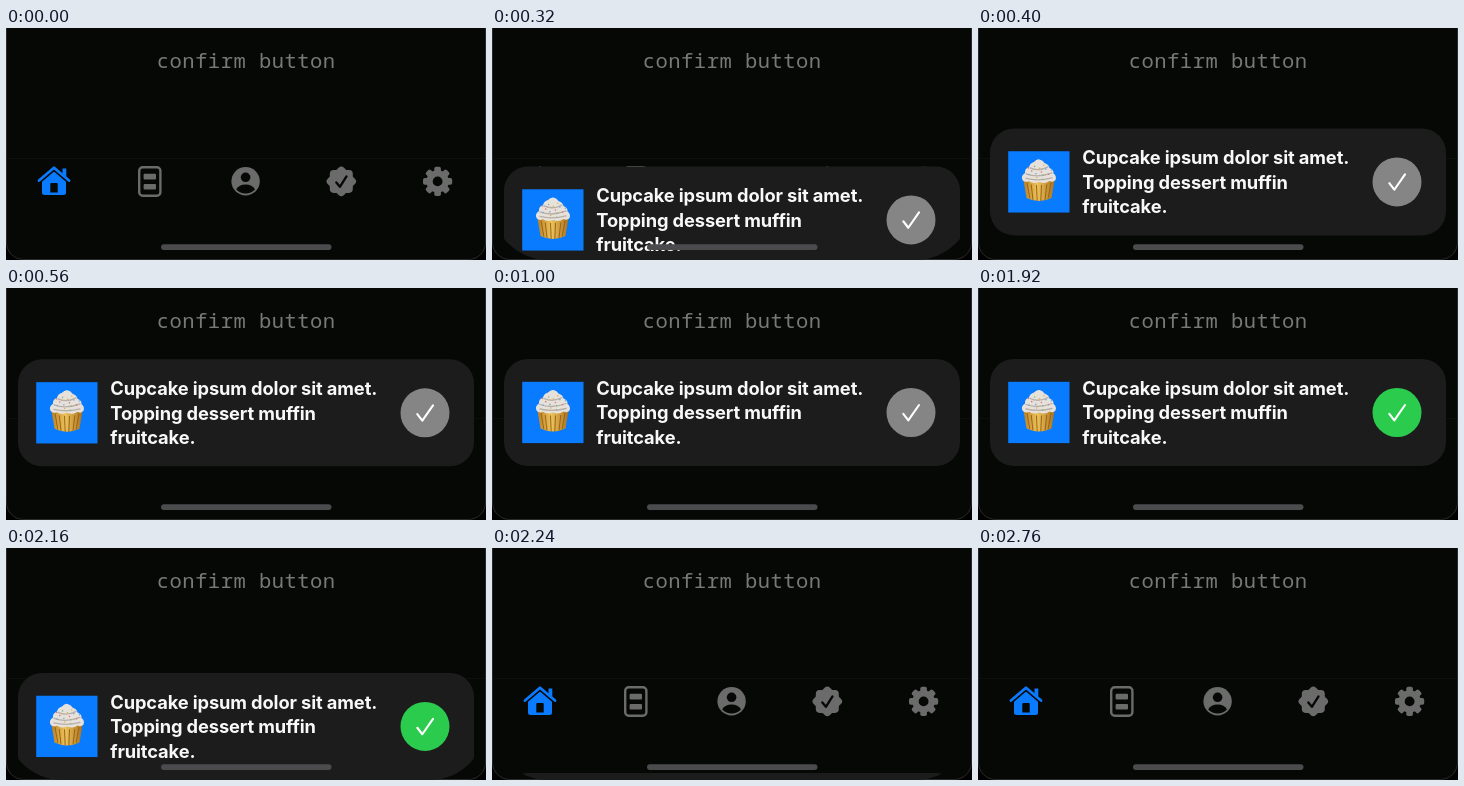
Recreate the animation shown at these times as an HTML page. Size 480 px wide and 232 px high, loop 2800 ms.

```html
<!DOCTYPE html>
<html lang="en">
<head>
<meta charset="utf-8">
<title>Confirm button</title>
<style>
html, body { margin: 0; width: 100%; height: 100%; overflow: hidden; background: #000; }
svg { display: block; width: 480px; height: 232px; }
.title { font: 20.5px "Noto Sans Mono", "DejaVu Sans Mono", monospace; letter-spacing: .48px; fill: #787878; text-anchor: middle; }
.copy { font: 700 18.3px Inter, "Liberation Sans", sans-serif; letter-spacing: -.12px; fill: #f8f8f8; }
.line { fill: none; stroke-linecap: round; stroke-linejoin: round; }
</style>
</head>
<body>
<svg viewBox="0 0 480 232">
  <defs>
    <clipPath id="screen"><rect y="-100" width="480" height="332" rx="56"/></clipPath>
    <linearGradient id="cup">
      <stop offset="0" stop-color="#b97d22"/>
      <stop offset=".45" stop-color="#ecc25a"/>
      <stop offset="1" stop-color="#a96f1c"/>
    </linearGradient>
  </defs>

  <rect x=".5" y="-40" width="479" height="271.5" rx="17" fill="#050804" stroke="#2a2a2a"/>
  <path d="M1 130.5H479" stroke="#0d0f0c"/>
  <text class="title" x="240.2" y="40">confirm button</text>

  <g fill="#0a7aff">
    <path class="line" d="M33 152.5L48 139.8L63 152.5" stroke="#0a7aff" stroke-width="2.8"/>
    <path d="M56.5 140.5H60.3V149L56.5 146Z"/>
    <path d="M48 143.6L60 153.8V164.5Q60 167 57.5 167H38.5Q36 167 36 164.5V153.8Z"/>
    <path d="M44.3 164.5V156Q44.3 155 45.3 155H50.7Q51.7 155 51.7 156V164.5Z" fill="#050804"/>
  </g>

  <g fill="#6b6b6b">
    <rect class="line" x="133.2" y="139.2" width="21.2" height="28.6" rx="3.5" stroke="#6b6b6b" stroke-width="2.4"/>
    <rect x="137.6" y="145.8" width="12.4" height="5.6" rx="1"/>
    <rect x="137.6" y="156" width="12.4" height="5.6" rx="1"/>

    <circle cx="239.6" cy="153.3" r="14.2"/>
    <g fill="#050804">
      <circle cx="239.6" cy="149.3" r="4.8"/>
      <path d="M230.2 161.5Q233 156.4 239.6 156.4T249 161.5Q245 165.6 239.6 165.6T230.2 161.5Z"/>
    </g>

    <g transform="translate(335.3 153.4)">
      <rect x="-11.5" y="-11.5" width="23" height="23" rx="3.8"/>
      <rect x="-11.5" y="-11.5" width="23" height="23" rx="3.8" transform="rotate(45)"/>
      <path class="line" d="M-5 1L-1.4 5.4L5.2 -5" stroke="#050804" stroke-width="2.3"/>
    </g>

    <g transform="translate(431.6 153.4)">
      <circle r="11.2"/>
      <g id="teeth"></g>
      <circle r="4.9" fill="#050804"/>
    </g>
  </g>

  <g clip-path="url(#screen)">
    <g id="card">
      <rect x="12" width="456" height="107" rx="24" fill="#1c1c1c"/>
      <rect x="30.2" y="22.8" width="61.3" height="61.3" fill="#087bff"/>
      <path d="M45 49H77L73.5 69.5Q61 75.5 48.5 69.5Z" fill="url(#cup)"/>
      <path d="M49 54L51.8 70M53.2 56L55 71.5M58.5 56.5L59.2 72.5M63.5 56.5L62.8 72.5M68.8 56L67 71.5M73 54L70.2 70" stroke="#9a6418"/>
      <path d="M44.5 51.5Q42.5 47.5 47 44.5Q46.5 40 51 38.5Q52 34.5 56 33.5Q58.5 30.5 61.5 31Q65 31.5 66.5 34.5Q71 36 71.5 39.5Q76 41 75.5 45Q79 47.5 77.5 51.5Q75 54.5 71.5 52.5Q67 56 61.2 53.5Q55 56 51 52.8Q47 54.5 44.5 51.5Z" fill="#e6e1db"/>
      <path class="line" d="M48 45.5Q60 50 74 44.5M52 39.5Q61 43.5 70 38.5M48 50Q60 53 74 49.5" stroke="#b9afa9" stroke-width="1.3"/>
      <g id="sprinkles"></g>
      <text class="copy">
        <tspan x="104.3" y="36">Cupcake ipsum dolor sit amet.</tspan>
        <tspan x="104.3" y="60.3">Topping dessert muffin</tspan>
        <tspan x="104.3" y="84.6">fruitcake.</tspan>
      </text>
      <circle id="button" cx="419" cy="53.5" r="24.5"/>
      <path class="line" d="M411.3 54.8L416.3 61.3L427 46" stroke="#fff" stroke-width="2.1"/>
    </g>
  </g>

  <rect x="155" y="216.2" width="170.5" height="5.8" rx="2.9" fill="#4b4b4d"/>
</svg>
<script>
const LOOP = 2800, SHOWN = 71, TRAVEL = 161;
const GREY = [133, 133, 133], PRESSED = [70, 70, 70], GREEN = [43, 203, 78];
const el = id => document.getElementById(id);
const ramp = (t, from, to) => Math.min(1, Math.max(0, (t - from) / (to - from)));
const mix = (a, b, p) => a.map((v, i) => v + (b[i] - v) * p);
const easeInOut = (p, n) => p < .5 ? (2 * p) ** n / 2 : 1 - (2 - 2 * p) ** n / 2;

el("teeth").innerHTML = [0, 45, 90, 135].map(a =>
  `<rect x="-3.3" y="-14.6" width="6.6" height="29.2" rx="1.8" transform="rotate(${a})"/>`).join("");

const colors = ["#d97a72", "#79a9d8", "#d8b85c", "#88b887"];
el("sprinkles").innerHTML = [...Array(14).keys()].map(i => {
  const r = Math.sqrt((i + .5) / 14), a = i * 2.4;
  return `<circle cx="${61 + 13 * r * Math.cos(a)}" cy="${43.5 + 8.5 * r * Math.sin(a)}" r=".8" fill="${colors[i % 4]}"/>`;
}).join("");

function draw(t) {
  const enter = easeInOut(ramp(t, 10, 590), 2.35);
  const leave = ramp(t, 1970, 2245) ** 3;
  const y = SHOWN + TRAVEL * (1 - enter + leave);
  el("card").setAttribute("transform", `translate(0 ${y})`);
  const pressed = mix(GREY, PRESSED, ramp(t, 1440, 1600));
  el("button").setAttribute("fill", `rgb(${mix(pressed, GREEN, ramp(t, 1680, 1840)).map(Math.round)})`);
}

const start = performance.now();
function tick() {
  draw((performance.now() - start) % LOOP);
  requestAnimationFrame(tick);
}
tick();
</script>
</body>
</html>
```
